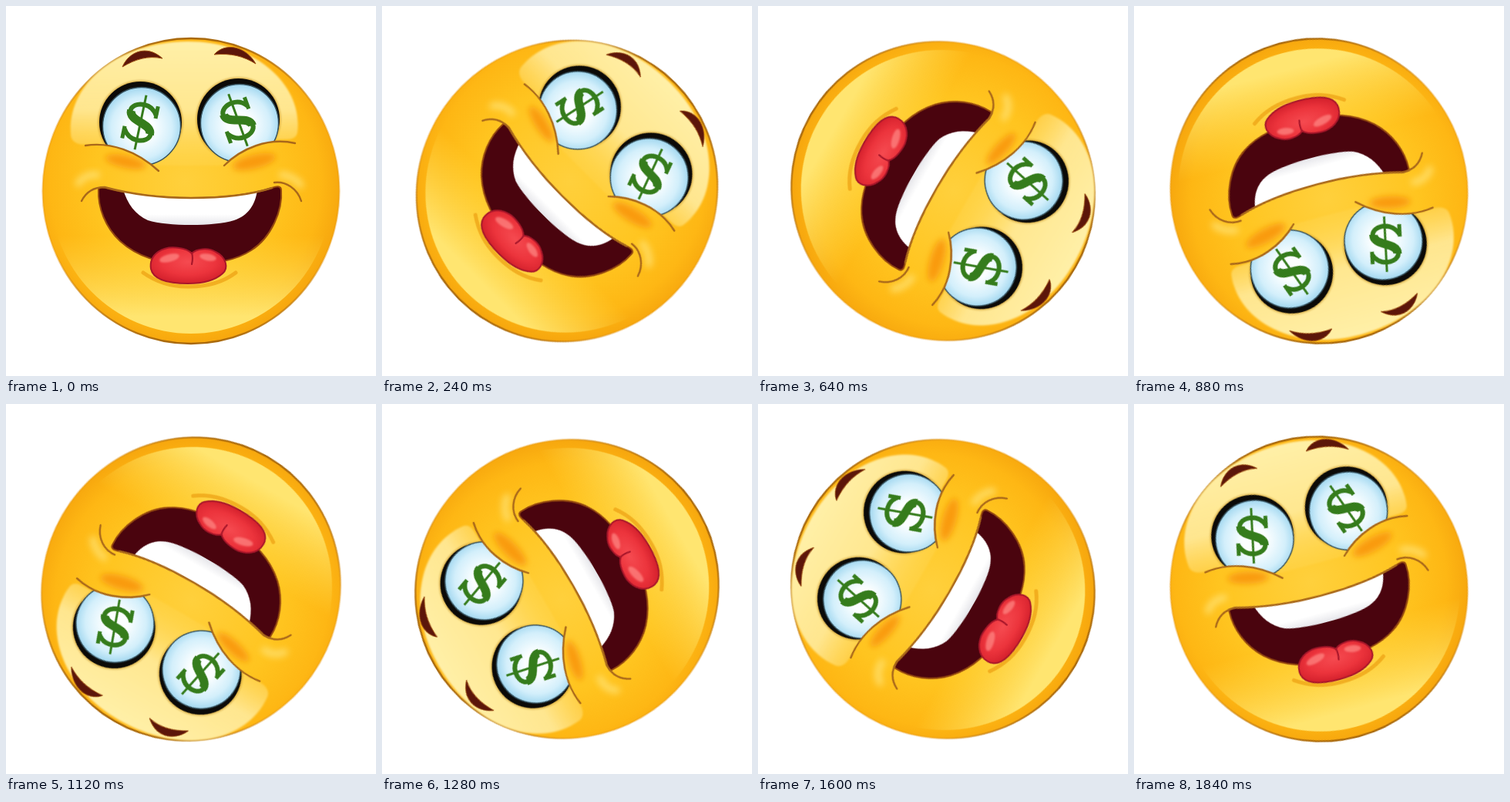
An HTML page for the animation above (1.92 s loop, 480x480 px).

```html
<!DOCTYPE html>
<html lang="en">
<head>
<meta charset="utf-8">
<title>Rolling money face</title>
<style>
  html, body { margin: 0; width: 100%; height: 100%; overflow: hidden; background: #fff; }
  svg { display: block; width: 100%; height: 100%; }
  .face { transform-origin: 240px 240px; animation: roll 1920ms steps(24, end) infinite; }
  .line { fill: none; stroke: #a9681a; stroke-width: 2.4; stroke-linecap: round; }
  .glow { fill: none; stroke: #ffe478; stroke-linecap: round; filter: url(#soft); }
  .blush { fill: #f99a10; filter: url(#soft); }
  .brow { fill: #5c160a; stroke: #9a4a10; stroke-width: 1; }
  @keyframes roll { to { transform: rotate(360deg); } }
</style>
</head>
<body>
<svg viewBox="0 0 480 480">
  <defs>
    <radialGradient id="skin" cx=".48" cy=".47" r=".55">
      <stop offset="0" stop-color="#ffd03c"/>
      <stop offset=".55" stop-color="#ffc520"/>
      <stop offset=".83" stop-color="#feb714"/>
      <stop offset="1" stop-color="#f5a30c"/>
    </radialGradient>
    <linearGradient id="rim" x2="0" y2="1">
      <stop offset="0" stop-color="#a8680c"/>
      <stop offset=".3" stop-color="#e8960a" stop-opacity=".4"/>
      <stop offset=".7" stop-color="#e8960a" stop-opacity=".4"/>
      <stop offset="1" stop-color="#a8680c"/>
    </linearGradient>
    <linearGradient id="shine" x2="0" y2="1">
      <stop offset="0" stop-color="#fff0a8"/>
      <stop offset=".55" stop-color="#ffeb9c" stop-opacity=".9"/>
      <stop offset="1" stop-color="#ffdc60" stop-opacity=".25"/>
    </linearGradient>
    <linearGradient id="chin" x2="0" y2="1">
      <stop offset=".66" stop-color="#ffdf50" stop-opacity="0"/>
      <stop offset=".94" stop-color="#ffe570"/>
    </linearGradient>
    <radialGradient id="iris" cx=".5" cy=".52" r=".52">
      <stop offset=".3" stop-color="#fbfeff"/>
      <stop offset=".75" stop-color="#d3effb"/>
      <stop offset="1" stop-color="#a3d8f0"/>
    </radialGradient>
    <radialGradient id="flesh" cx=".5" cy=".4" r=".6">
      <stop offset="0" stop-color="#f54a50"/>
      <stop offset=".6" stop-color="#ec343c"/>
      <stop offset="1" stop-color="#d4202c"/>
    </radialGradient>
    <linearGradient id="enamel" x2="0" y2="1">
      <stop offset=".7" stop-color="#fff"/>
      <stop offset="1" stop-color="#e6e6ea"/>
    </linearGradient>
    <filter id="soft" x="-40%" y="-80%" width="180%" height="260%">
      <feGaussianBlur stdDeviation="4"/>
    </filter>
    <filter id="blur">
      <feGaussianBlur stdDeviation="1.2"/>
    </filter>
    <clipPath id="leftLid"><path d="M90 60V180H103C135 176 170 188 197 213L240 215V60Z"/></clipPath>
    <clipPath id="rightLid"><path d="M240 60V215L283 207C305 185 340 170 378 178V60Z"/></clipPath>
    <clipPath id="lips"><path id="mouth" d="M120 238C121 234 128 235 133 237C165 245 200 249 240 249C285 249 320 244 345 236C353 233 357 234 357 239C359 264 345 300 318 317C297 331 268 335 238 335C200 335 170 325 148 305C129 287 119 262 120 238Z"/></clipPath>
    <g id="eye">
      <ellipse cx="-.5" cy="-3" rx="55" ry="54.5" fill="#c8962c" opacity=".7" filter="url(#blur)"/>
      <ellipse cx="-.5" cy="-3" rx="53.5" ry="53" fill="#0b0a08"/>
      <circle cx="1" cy="2" r="50.5" fill="url(#iris)" stroke="#35505c" stroke-width="1.4"/>
    </g>
    <g id="dollar" fill="none" stroke="#357c1c">
      <path d="M18-13C13-21 7-23.5 0-23.5C-9-23.5-16-19-16-12C-16 2 16-2 16 12C16 19 9 23.5 0 23.5C-8 23.5-14 20-19 12" stroke-width="6"/>
      <path d="M-15-13C-16 2 16-2 15 13" stroke-width="11"/>
      <path d="M18-25V-9M-19 9V25" stroke-width="5"/>
      <path d="M0-36V36" stroke-width="3"/>
    </g>
  </defs>

  <g class="face">
    <ellipse cx="240" cy="240" rx="192.5" ry="198" fill="url(#skin)" stroke="url(#rim)" stroke-width="2.4"/>
    <ellipse cx="240" cy="238" rx="183" ry="187" fill="url(#chin)"/>
    <path d="M84 166C80 104 140 47 236 46C325 46 386 104 378 164C376 176 362 172 346 174C320 180 300 190 285 207H197C172 186 135 177 104 180C92 180 84 176 84 166Z" fill="url(#shine)" filter="url(#blur)"/>

    <g class="blush">
      <ellipse cx="155" cy="202" rx="27" ry="8" transform="rotate(12 155 202)"/>
      <ellipse cx="322" cy="202" rx="29" ry="9" transform="rotate(-14 322 202)"/>
    </g>
    <path class="glow" stroke-width="9" d="M94 230Q102 218 118 219M358 219Q374 221 382 232" opacity=".75"/>

    <g clip-path="url(#leftLid)"><use href="#eye" x="175" y="154"/></g>
    <g clip-path="url(#rightLid)"><use href="#eye" x="302" y="150"/></g>
    <use href="#dollar" transform="translate(174.5 151) rotate(12)"/>
    <use href="#dollar" transform="translate(301 148) rotate(-20)"/>

    <path class="line" d="M103 181C135 176 170 188 198 214M283 207C305 185 340 170 375 178"/>
    <path class="brow" d="M151 79C159 60 182 49 203 68C184 64 168 69 151 79Z"/>
    <path class="brow" d="M270 63C285 46 312 53 324 75C308 65 292 61 270 63Z"/>

    <path d="M178 346Q205 365 238 364Q274 364 298 346" fill="none" stroke="#eda012" stroke-width="5" stroke-linecap="round" opacity=".7"/>
    <use href="#mouth" fill="#4a040e" stroke="#94480f" stroke-width="2"/>
    <g clip-path="url(#lips)">
      <path d="M152 238C180 250 290 250 326 238C324 257 314 272 296 278C270 286 210 286 184 278C168 271 157 256 152 238Z" fill="url(#enamel)"/>
    </g>
    <path class="line" d="M98 253C103 243 111 235 128 235C165 245 200 249 240 249C285 249 320 244 345 236M348 229C363 227 378 237 383 253"/>

    <path d="M188 341C185 322 204 310 225 314C233 315 238 318 241 321C247 315 262 313 272 319C286 326 289 340 281 347C270 357 252 360 236 360C211 360 191 355 188 341Z" fill="url(#flesh)" stroke="#a8162a" stroke-width="2"/>
    <path d="M241 320Q243 327 241 335" fill="none" stroke="#a8162a" stroke-width="2.2" stroke-linecap="round"/>
    <g fill="#ff8a86" opacity=".7" filter="url(#blur)">
      <ellipse cx="212" cy="327" rx="13" ry="5" transform="rotate(-14 212 327)"/>
      <ellipse cx="262" cy="326" rx="11" ry="4.5" transform="rotate(10 262 326)"/>
    </g>
  </g>
</svg>
</body>
</html>
```
